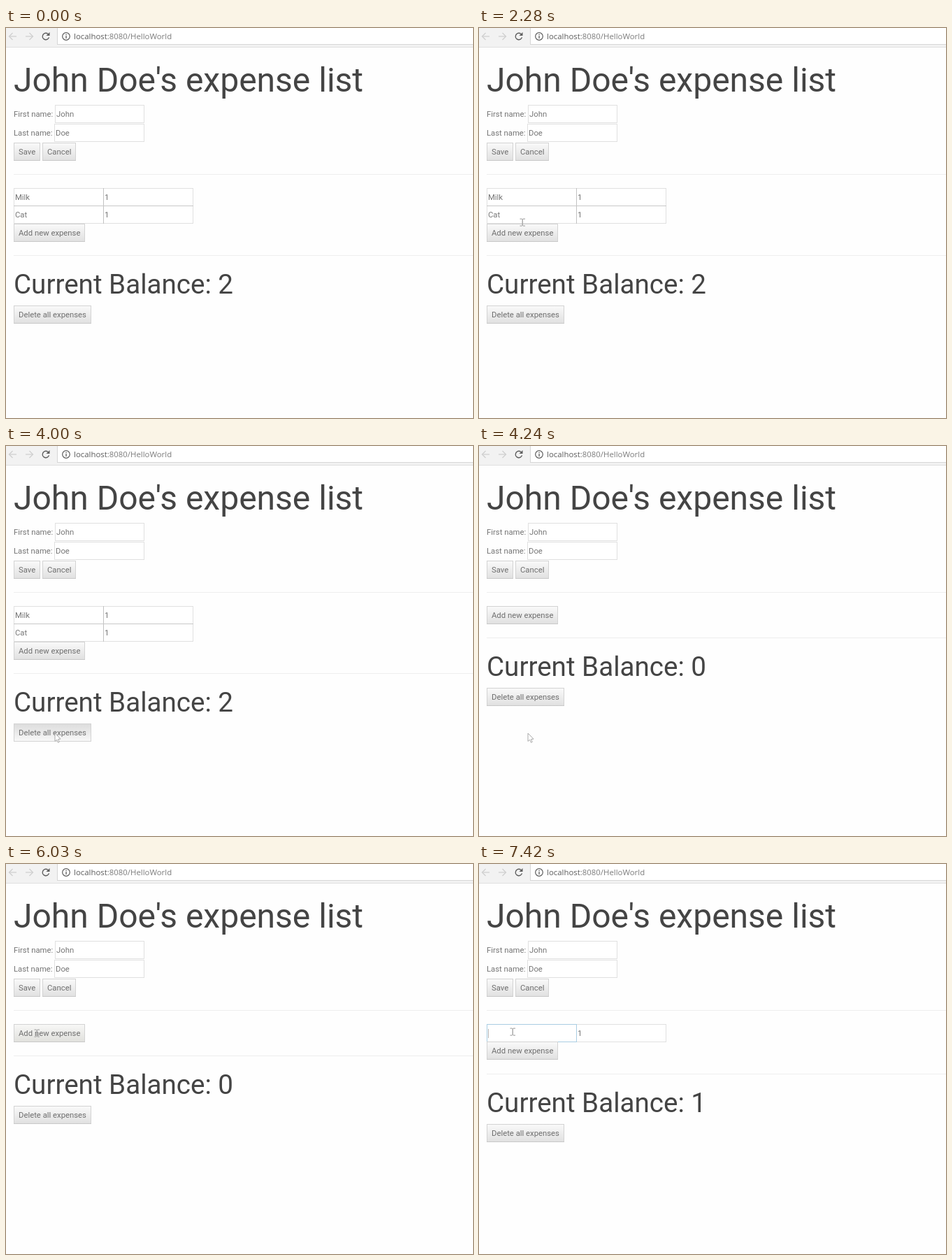
An HTML page with a canvas that plays this animation: 668x558 px, repeating every 8 s.

```html
<!DOCTYPE html>
<html lang="en">
<head>
<meta charset="utf-8">
<title>Expense list</title>
<style>
html, body { margin: 0; width: 100%; height: 100%; overflow: hidden; background: #fefefe; }
canvas { display: block; }
</style>
</head>
<body>
<canvas id="stage" width="668" height="558"></canvas>
<script>
const c = document.getElementById('stage').getContext('2d');
const LOOP = 8000;
const UI = 'Roboto, Arial, sans-serif';

// Pointer moves: start, end, number of jumps, then the way points [x, y, shape]
const moves = [
  [310, 420, 2, [203, 360, 'arrow'], [109, 312, 'arrow']],
  [940, 940, 1, [92, 304, 'hand']],
  [1340, 1610, 4, [92, 306, 'hand'], [93, 302, 'hand']],
  [2000, 2000, 1, [60, 209, 'arrow']],
  [2140, 2280, 2, [60, 238, 'beam'], [62, 278, 'beam']],
  [2350, 2880, 8, [60, 288, 'hand'], [24, 288, 'hand'], [90, 294, 'hand'], [80, 318, 'arrow'], [60, 333, 'arrow']],
  [3020, 3020, 1, [64, 340, 'beam']],
  [3200, 3750, 7, [64, 362, 'beam'], [28, 392, 'arrow'], [102, 405, 'hand'], [71, 411, 'hand']],
  [4000, 4000, 1, [70, 411, 'arrow']],
  [4710, 4900, 3, [82, 360, 'arrow'], [105, 224, 'arrow']],
  [5070, 5800, 10, [84, 191, 'hand'], [70, 175, 'hand'], [50, 344, 'arrow'], [44, 242, 'hand']],
  [6030, 6030, 1, [44, 242, 'beam']],
  [6410, 6790, 5, [45, 248, 'beam'], [44, 258, 'hand'], [45, 269, 'hand']],
  [6870, 7210, 6, [46, 264, 'hand'], [48, 246, 'beam'], [48, 240, 'beam']]
];

function pointerAt(t) {
  const move = moves.filter(m => m[0] <= t).pop();
  if (!move) return null;
  const [start, end, jumps, ...path] = move;
  if (jumps === 1) return path[0];
  const gap = (end - start) / (jumps - 1);
  const step = Math.min(jumps - 1, Math.floor((t - start) / gap + 0.001));
  const pos = step / (jumps - 1) * (path.length - 1);
  const i = Math.floor(pos + 1e-6);
  const a = path[i], b = path[Math.min(i + 1, path.length - 1)];
  const mix = k => Math.round(a[k] + (b[k] - a[k]) * (pos - i));
  return [mix(0), mix(1), a[2]];
}

function text(str, x, y, size = 11.3, color = '#757575', family = UI) {
  c.font = `${size}px ${family}`;
  c.fillStyle = color;
  c.fillText(str, x, y);
}

function rect(x, y, w, h, color) {
  c.fillStyle = color;
  c.fillRect(x, y, w, h);
}

function frame(x, y, w, h, fill, line) {
  rect(x, y, w, h, fill);
  c.strokeStyle = line;
  c.lineWidth = 1;
  c.strokeRect(x + 0.5, y + 0.5, w - 1, h - 1);
}

function path(points, close) {
  c.beginPath();
  points.forEach(([x, y]) => c.lineTo(x, y));
  if (close) c.closePath();
}

const looks = {
  normal: ['#fafafa', '#e0e0e0'],
  hover: ['#f8f8f7', '#e0e0dc'],
  pressed: ['#dcdcdc', '#f9f9f9']
};

function button(label, x, y, w, look = 'normal') {
  const g = c.createLinearGradient(0, y, 0, y + 26);
  looks[look].forEach((color, i) => g.addColorStop(i, color));
  frame(x, y, w, 26, g, '#d3d3d3');
  if (look !== 'pressed') rect(x, y + 25, w, 1, '#c8c8c8');
  text(label, x + 7, y + 17, 11.3, '#6e6e6e');
}

function field(value, x, y, w = 129) {
  frame(x, y, w, 26, '#fff', '#e0e0e0');
  text(value, x + 2, y + 17);
}

function browserBar() {
  rect(0, 0, 668, 27, '#f2f2f2');
  rect(0, 27, 668, 1, '#dfdfdf');
  frame(73, -3, 600, 27, '#fff', '#d6d6d6');
  c.lineWidth = 1.2;
  c.strokeStyle = '#cfcfcf';
  for (const [x, dir] of [[9.5, 1], [33.5, -1]]) {
    path([[x + 5.5 * dir, 12], [x - 5 * dir, 12]]);
    c.stroke();
    path([[x, 7], [x - 5 * dir, 12], [x, 17]]);
    c.stroke();
  }
  c.strokeStyle = c.fillStyle = '#5c5c5c';
  c.lineWidth = 1.4;
  c.beginPath();
  c.arc(57, 12, 4.7, 0.3, 5.4);
  c.stroke();
  path([[62.5, 6], [62.5, 11], [57.5, 11]], true);
  c.fill();
  c.lineWidth = 1.2;
  c.beginPath();
  c.arc(86, 12, 5.3, 0, 7);
  c.stroke();
  rect(85.4, 11, 1.3, 4, '#5c5c5c');
  rect(85.4, 8.7, 1.3, 1.4, '#5c5c5c');
  const font = '"Open Sans", "Noto Sans", sans-serif';
  text('localhost', 97, 16, 11.4, '#5c5c5c', font);
  text(':8080/HelloWorld', 97 + c.measureText('localhost').width, 16, 11.4, '#7c7c7c', font);
}

function profile() {
  text("John Doe's expense list", 11, 91, 48, '#444');
  text('First name:', 11, 126.5);
  field('John', 70, 110, 128);
  text('Last name:', 11, 153.5);
  field('Doe', 69, 137);
  button('Save', 11, 164, 38);
  button('Cancel', 52, 164, 48);
  rect(11, 209, 657, 1, '#eeeeee');
}

function expenses(t) {
  const rows = t < 4240 ? ['Milk', 'Cat'] : t < 6270 ? [] : [''];
  rows.forEach((name, i) => {
    const y = 229 + 25 * i;
    field(name, 11, y);
    field('1', 139, y);
    rect(139, y, 1, 26, '#c2c2c2');
    if (i) rect(11, y, 257, 1, '#c8c8c8');
  });
  if (t >= 7280) {
    c.strokeStyle = t < 7350 ? '#c9dce8' : '#a9cde2';
    c.strokeRect(11.5, 229.5, 128, 25);
    if (t >= 7420) rect(13, 236, 1, 13, '#b5b5b5');
  }
  const up = [51, 25, 0][rows.length];
  const pressed = t >= 3930 && t < 4240;
  const hover = t >= 5960 && t < 6270;
  button('Add new expense', 11, [229, 254, 280][rows.length], 102, hover ? 'hover' : 'normal');
  rect(11, 325 - up, 657, 1, '#eeeeee');
  text('Current Balance: ' + rows.length, 11, 380 - up, 38.6, '#444');
  button('Delete all expenses', 11, 397 - up, 111, pressed ? 'pressed' : 'normal');
}

const shapes = {
  arrow: [[0, 0], [0, 11.5], [2.7, 9.2], [4.4, 13.3], [6.2, 12.5], [4.6, 8.5], [8, 8.2]],
  hand: [[-1, 1], [0, 0], [1.2, 1], [1.2, 5.5], [4.5, 6], [7.3, 7.2], [7.3, 11], [5.8, 15], [0.5, 15], [-3, 9.8], [-2.4, 8.6], [-1, 9.6]]
};

function pointer(x, y, kind) {
  c.save();
  c.translate(x, y);
  c.lineWidth = 1;
  c.lineJoin = 'round';
  if (kind === 'beam') {
    rect(-0.5, -5, 1.5, 10, '#aaa');
    for (const end of [-5.5, 4.5]) {
      rect(-3.5, end, 3, 1.3, '#b0b0b0');
      rect(1, end, 3, 1.3, '#b0b0b0');
    }
  } else {
    path(shapes[kind], true);
    c.fillStyle = '#fff';
    c.fill();
    c.strokeStyle = '#aaa';
    c.stroke();
    if (kind === 'hand') {
      for (const k of [3, 5.2]) {
        path([[k, 6.5], [k, 9]]);
        c.stroke();
      }
    }
  }
  c.restore();
}

function draw(now) {
  const t = now % LOOP;
  rect(0, 0, 668, 558, '#fefefe');
  browserBar();
  profile();
  expenses(t);
  const p = pointerAt(t);
  if (p) pointer(...p);
}

const begin = performance.now();
function tick() {
  draw(performance.now() - begin);
  requestAnimationFrame(tick);
}
tick();
</script>
</body>
</html>
```
